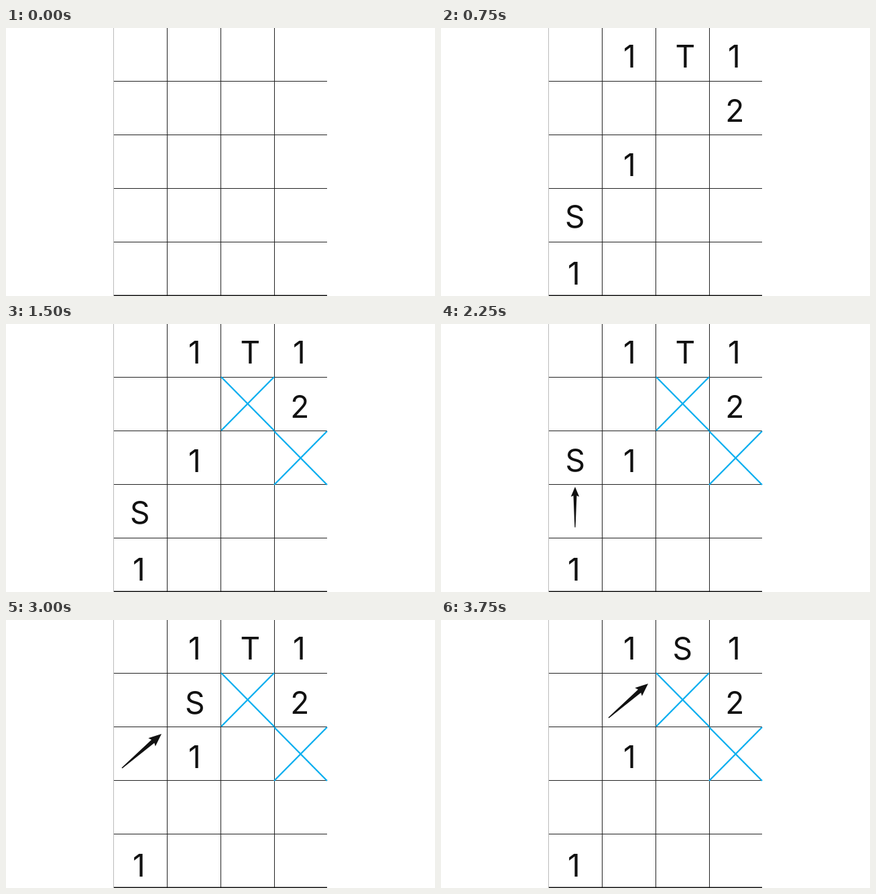
Write an HTML page with a canvas that moves like this. It is 640 px wide and 400 px high and loops after 4.5 s.

```html
<!DOCTYPE html>
<html lang="en">
<head>
<meta charset="utf-8">
<title>Grid moves</title>
<style>
  html, body { margin: 0; width: 100%; height: 100%; overflow: hidden; background: #fff; }
  canvas { display: block; }
</style>
</head>
<body>
<canvas id="stage" width="640" height="400"></canvas>
<script>
const ctx = document.getElementById('stage').getContext('2d');
const STEP = 750, STEPS = 6;
const INK = '#111', BLUE = '#08aeef';

function line(x1, y1, x2, y2, color, width) {
  ctx.strokeStyle = color;
  ctx.lineWidth = width;
  ctx.beginPath();
  ctx.moveTo(x1, y1);
  ctx.lineTo(x2, y2);
  ctx.stroke();
}

// Centres the visible ink of a glyph on x.
function glyph(char, x, baseline) {
  ctx.font = '400 46px Inter, sans-serif';
  ctx.fillStyle = INK;
  const m = ctx.measureText(char);
  ctx.fillText(char, x + (m.actualBoundingBoxLeft - m.actualBoundingBoxRight) / 2, baseline);
}

function cross(x, y) {
  line(x, y, x + 79, y + 80, BLUE, 2.3);
  line(x + 79, y, x, y + 80, BLUE, 2.3);
}

function arrow(tailX, tailY, tipX, tipY) {
  const dx = tipX - tailX, dy = tipY - tailY;
  const scale = Math.hypot(dx, dy) / 78;
  ctx.save();
  ctx.translate(tipX, tipY);
  ctx.rotate(Math.atan2(dy, dx));
  ctx.scale(scale, scale);
  ctx.fillStyle = INK;
  ctx.beginPath();
  ctx.moveTo(0, 0);
  for (const [x, y] of [[-19, 8], [-17, 3.2], [-78, 0.8], [-78, -0.8], [-17, -3.2], [-19, -8]]) ctx.lineTo(x, y);
  ctx.fill();
  ctx.restore();
}

function grid() {
  line(160.5, 0, 160.5, 400, '#bbb', 1);
  for (let x = 240.5; x < 420; x += 80) line(x, 0, x, 400, '#222', 1);
  for (let y = 79.5; y < 330; y += 80) line(161, y, 479, y, '#222', 1);
  line(161, 399.2, 479, 399.2, '#111', 1.6);
}

function numbers() {
  glyph('1', 280.5, 59);
  glyph('1', 436.5, 59);
  glyph('2', 438.3, 139.5);
  glyph('1', 280.5, 221);
  glyph('1', 197.5, 383);
}

const moves = {
  3() { glyph('S', 200, 219.5); arrow(200, 303.5, 200, 243); },
  4() { glyph('S', 281.5, 140); arrow(173, 221, 232, 170); },
  5() { glyph('S', 360, 59); arrow(250, 146, 309, 95); }
};

function draw(step) {
  ctx.fillStyle = '#fff';
  ctx.fillRect(0, 0, 640, 400);
  grid();
  if (step === 0) return;
  numbers();
  if (step < 5) glyph('T', 364.5, 59);
  if (step >= 2) {
    cross(321, 79);
    cross(400, 160);
  }
  if (step < 3) glyph('S', 199.5, 298);
  else moves[step]();
}

const start = performance.now();
function tick() {
  draw(Math.floor((performance.now() - start) / STEP) % STEPS);
  requestAnimationFrame(tick);
}
tick();
</script>
</body>
</html>
```
